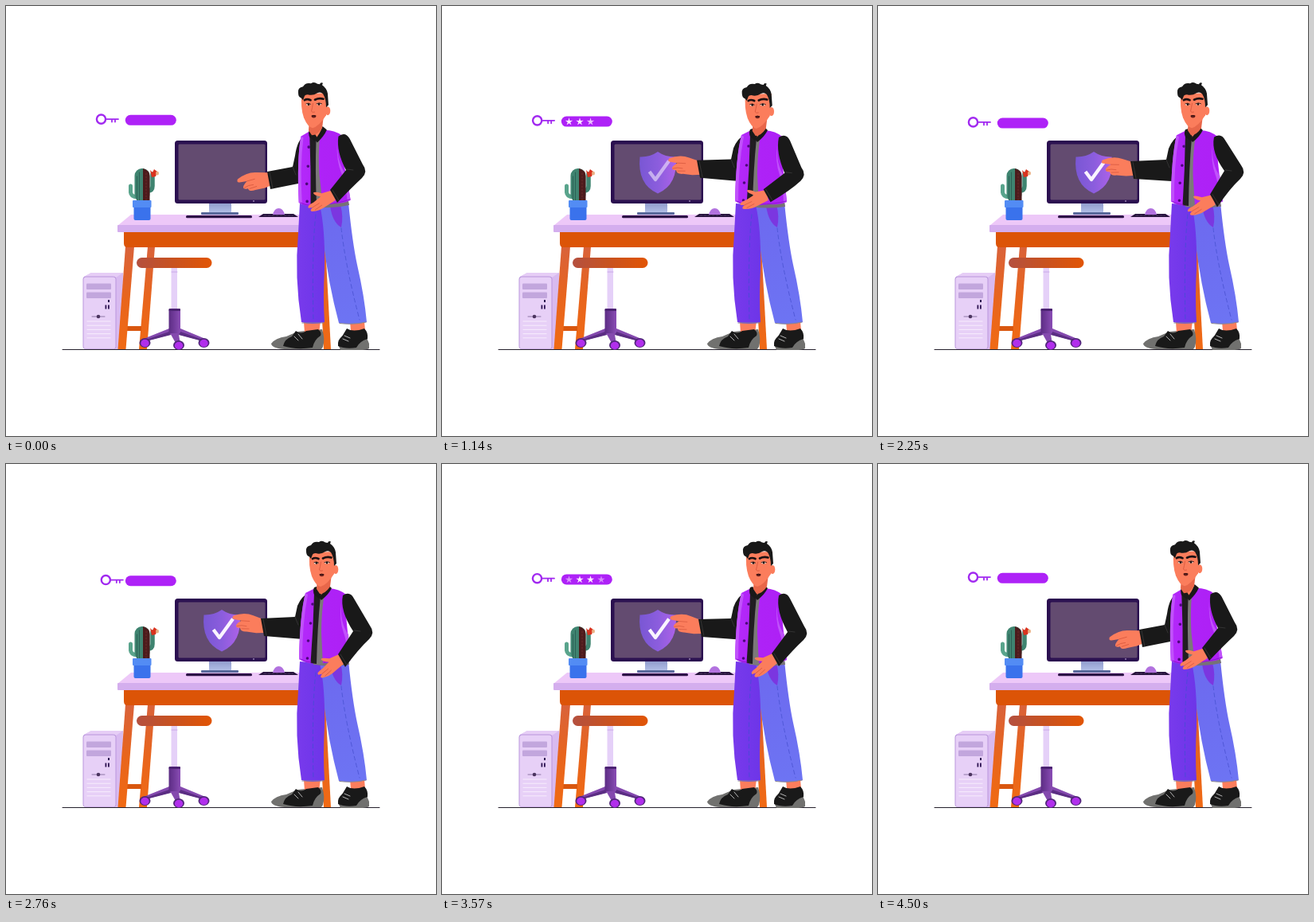
An HTML page with a canvas for the animation above (4.53 s loop, 540 px wide and 540 px high).

```html
<!DOCTYPE html>
<html lang="en">
<head>
<meta charset="utf-8">
<title>Password protection</title>
<style>
html, body { margin: 0; width: 100%; height: 100%; overflow: hidden; background: #fff; }
canvas { display: block; width: 540px; height: 540px; }
</style>
</head>
<body>
<canvas id="stage"></canvas>
<script>
const LOOP = 4530, STEP = 30, CYCLE = LOOP / 2;
const canvas = document.getElementById('stage');
const ctx = canvas.getContext('2d');
const ratio = window.devicePixelRatio || 1;
canvas.width = canvas.height = 540 * ratio;

const SKIN = '#fb7d5c', SKIN_DARK = '#d95a40', BLACK = '#191919';
const PURPLE = '#ae22f7', INK = '#2b1050';

const clamp = v => Math.max(0, Math.min(1, v));
const ease = (t, from, to) => {
  const p = clamp((t - from) / (to - from));
  return p * p * (3 - 2 * p);
};

function fill(d, color) {
  ctx.fillStyle = color;
  ctx.fill(new Path2D(d));
}
function line(d, color, width = 1, dash = []) {
  ctx.strokeStyle = color;
  ctx.lineWidth = width;
  ctx.setLineDash(dash);
  ctx.stroke(new Path2D(d));
}
function box(x, y, w, h, r, color) {
  ctx.fillStyle = color;
  ctx.beginPath();
  ctx.roundRect(x, y, w, h, r);
  ctx.fill();
}
function oval(x, y, rx, ry, color) {
  ctx.fillStyle = color;
  ctx.beginPath();
  ctx.ellipse(x, y, rx, ry, 0, 0, Math.PI * 2);
  ctx.fill();
}
function blend(x0, y0, x1, y1, ...colors) {
  const g = ctx.createLinearGradient(x0, y0, x1, y1);
  colors.forEach((c, i) => g.addColorStop(i / (colors.length - 1), c));
  return g;
}
function within(x, y, angle, draw) {
  ctx.save();
  ctx.translate(x, y);
  ctx.rotate(angle);
  draw();
  ctx.restore();
}

// time, lean, head x/y, left elbow x/y, left cuff x/y, left hand turn,
// right elbow x/y, right wrist x/y, right hand turn
const REST = [-.065, -9, -.8, 360, 202, 330, 219, -.37, 451, 208, 405, 238, -.14];
const POSES = [
  [0, ...REST],
  [690, 0, 0, 0, 363, 194, 325, 207, 0, 452, 211, 400, 237, 0],
  [1590, 0, 1, 0, 363, 192, 320, 204, -.1, 457, 212, 405, 238, -.07],
  [2250, -.012, 0, -.8, 362, 193, 319, 206, -.08, 459, 209, 415, 243.5, -.1],
  [2760, 0, 1, 0, 363, 192, 322, 205, -.03, 460, 212, 415, 246, -.27],
  [3570, 0, 2, 0, 363, 194, 324, 206, -.02, 458, 213, 412, 245, -.28],
  [3840, 0, 1.6, 0, 363, 194, 325, 206.5, -.02, 457, 212, 411, 244, -.26],
  [4500, ...REST],
  [LOOP, ...REST]
];

// Cubic interpolation that never overshoots a pose.
function poseAt(t) {
  let i = 0;
  while (i < POSES.length - 2 && t >= POSES[i + 1][0]) i++;
  const a = POSES[i], b = POSES[i + 1], h = b[0] - a[0], p = (t - a[0]) / h;
  const slope = (k, c) => {
    const m = POSES[k], n = POSES[k + 1];
    return m && n ? (n[c] - m[c]) / (n[0] - m[0]) : 0;
  };
  const tangent = (k, c) => {
    const s = slope(k - 1, c), e = slope(k, c);
    return s * e <= 0 ? 0 : 2 * s * e / (s + e);
  };
  return a.slice(1).map((v, j) => {
    const c = j + 1, q = 1 - p;
    return v * (1 + 2 * p) * q * q + b[c] * p * p * (3 - 2 * p)
      + h * (tangent(i, c) * p * q * q - tangent(i + 1, c) * p * p * q);
  });
}

function drawTower() {
  fill('M98 340L107 335H147L146 431H136V340Z', '#d8baf0');
  fill('M98 340L107 335H147L138 341Z', '#e6cdf6');
  box(96.5, 339.5, 42, 91.5, 4, '#b996dc');
  box(97.5, 340.5, 40, 90, 3, '#e7d0f7');
  box(101, 348.5, 31, 7.5, 1, '#c2a6dd');
  box(101, 359.5, 31, 7.5, 1, '#c2a6dd');
  box(128, 369, 2, 3, 0, INK);
  box(124.5, 375.5, 1.8, 5, 0, INK);
  box(128, 375.5, 1.8, 5, 0, INK);
  line('M108 390H124', '#8d77a6');
  oval(116, 390, 2.3, 2.3, '#4c3560');
  for (let y = 396; y < 420; y += 5.2) line(`M102 ${y}H131`, '#f7ecfd', 1);
}

function drawDesk() {
  const wood = blend(0, 303, 0, 431, '#d9623a', '#e8651d', '#f06a14');
  fill('M178 302H187L177 431H167Z', wood);
  fill('M152 402H170V408H151Z', '#d9570f');
  fill('M150 302H161L150.5 431H140.5Z', wood);
  fill('M392 300H401L408 431H399Z', wood);
  fill('M148 283H374V303H152Q148 303 148 298Z', '#dc5407');
  fill('M157 262H376V276H140Z', '#edc8f8');
  box(140, 275, 234, 9, 1, '#d4aeee');
}

function drawChair() {
  box(207.5, 328, 7.5, 54, 0, '#e5d0f8');
  line('M208 334H215', '#c9a9e8');
  box(164, 316, 94.5, 13, 6.5, blend(164, 0, 258, 0, '#b4503f', '#c9521f', '#e15505'));
  fill('M205 405L175 417V421L207 412.500L214 425H219L217 412.500L248 421V417L219 405Z', '#8449ae');
  fill('M205 409L176 419V421L207 413Z', '#5b2d83');
  fill('M219 409L247 419V421L217 413Z', '#5b2d83');
  box(204.5, 380, 14.5, 31, 2, blend(204, 0, 219, 0, '#5a2b82', '#8a4db5'));
  box(204.5, 380, 14.5, 3, 1, '#4b2272');
  for (const [x, y] of [[174.5, 423], [217, 426], [248.5, 423]]) {
    oval(x, y, 7, 6, '#51267a');
    oval(x, y + .5, 5.2, 4.7, '#b12fec');
  }
}

function drawMonitor() {
  box(255, 247, 28, 13, 0, blend(0, 247, 0, 260, '#8f9acb', '#b3c0e8'));
  box(245, 259, 47, 3, 1, '#59699c');
  box(212, 169, 116, 79, 3.5, INK);
  box(216.5, 173.5, 109, 70, 1.5, '#634b70');
  oval(311, 245, .8, .8, '#d8c7ee');
  box(226, 263, 83, 3.2, 1.5, '#2c1146');
  fill('M317 265L323 261H361L367 265Z', '#25123b');
  line('M324 263H360', '#5c4673', .7, [3, 2]);
  fill('M335 262Q337 254 342.5 254Q348 254 350 262Z', '#b272df');
}

function drawCactus() {
  line('M156.5 226V234Q157 239 164 240', '#59a48c', 5);
  line('M184 211V226Q184 232 178 232', '#3f8470', 5.5);
  box(161.5, 204, 19, 42, 9, '#3f8470');
  fill('M172 204Q180.500 206 180.500 214V246H172Z', '#4b1b1c');
  line('M167.500 209V244M164.500 214V244', '#28594f', .8);
  line('M176 210V244', '#7a3030', .8, [2, 2]);
  fill('M181 206L184 209L186 205L190 208L188 214L183 215Z', '#da331f');
  oval(190, 210, 2, 2.5, '#eab185');
  box(160.5, 249, 21, 20, 2, '#3a72ec');
  box(159, 244, 23.5, 9, 1, '#538cf4');
}

function drawShield(t) {
  const out = 1 - ease(t, 3880, 4320);
  ctx.globalAlpha = ease(t, 390, 1000) * out;
  fill('M271 183Q281 190 293.5 189.5Q297 224 271 235.5Q245 224 248.5 189.5Q261 190 271 183Z',
    blend(248, 0, 294, 0, '#7957d4', '#8b5ddd', '#ad62e9'));
  ctx.globalAlpha = ease(t, 900, 1350) * out;
  ctx.lineCap = 'butt';
  line('M260.500 208L268 218L285 194.500', '#faf4ff', 4.4);
  ctx.lineCap = 'round';
  ctx.globalAlpha = 1;
}

function drawStar(x, y) {
  ctx.fillStyle = '#fdeeff';
  ctx.beginPath();
  for (let i = 0; i < 10; i++) {
    const r = i % 2 ? 1.8 : 5, a = (i / 5 - .5) * Math.PI;
    ctx.lineTo(x + r * Math.cos(a), y + r * Math.sin(a));
  }
  ctx.fill();
}

function drawPassword(t) {
  const local = t % CYCLE;
  const y = 145.2 - 1.9 * Math.cos(2 * Math.PI * (t - 60) / LOOP);
  box(149.8, y - 6.5, 64, 13, 6.5, PURPLE);
  for (let i = 0; i < 4; i++) {
    ctx.globalAlpha = ease(local, 590 + i * 205, 790 + i * 205)
      * (1 - ease(local, 1205 + i * 240, 1425 + i * 240));
    drawStar(159.5 + i * 13.5, y + .3);
  }
  ctx.globalAlpha = 1;
  const slide = 6.3 * Math.sin(Math.PI * clamp(local / 1200)) ** 2;
  within(119.5 + slide, y - 1.2, 0, () => {
    ctx.strokeStyle = '#a129f0';
    ctx.lineWidth = 2.4;
    ctx.setLineDash([]);
    ctx.beginPath();
    ctx.arc(0, 0, 5.6, 0, Math.PI * 2);
    ctx.stroke();
    line('M6 0H21.5M13.5 0V3.5M17.5 0V3.5', '#a129f0', 1.8);
  });
}

function drawLegs() {
  fill('M333 424Q338 417 352 415L366 409L397 406Q401 418 398 428L396 431H350Q334 430 333 424Z', '#71716f');
  fill('M417 425L422 414H452L456 424V430Q452 432.500 440 432H420Z', '#71716f');
  fill('M374 396H395L393 411H375Z', SKIN);
  fill('M432 396H450L451 408H433Z', SKIN);
  fill('M348 427Q350 418 359 415L364 408Q370 413 377 408L392 406Q397 410 395 414Q387 419 385 429Q364 432 348 427Z', BLACK);
  fill('M417 427Q416 419 422 415L428 405Q436 410 450 405Q455 410 454 418Q444 421 440 429Q426 431 417 427Z', BLACK);
  line('M362 415L367 420M367 412L372 418M425 414L432 417M423 418L430 421', '#dedede', .8);
  fill('M389 250L430 247Q435 297 441 325Q450 364 453 397Q436 401 418 398Q405 350 398 292Z',
    blend(398, 250, 440, 398, '#6d69ef', '#6d74f3'));
  fill('M369 248L394 250Q401 280 400 330Q398 365 400 397Q385 401 371 397Q362 340 367 285Z',
    blend(366, 0, 401, 0, '#783aec', '#6d35e8'));
  fill('M407 251L420 250Q424 264 421 278Q410 272 407 251Z', '#7b36e0');
  line('M389 262Q384 305 386 395', '#4d49d8', 1, [5, 4]);
  line('M421 279Q426 325 444 394', '#5058d8', 1, [5, 4]);
  line('M372 398H399M419 398.500Q436 400.500 452 397', '#8a858f', 1.2);
}

function drawPointingHand() {
  fill('M4 -9L-11 -15Q-22 -20 -36 -15.500Q-39 -12 -35 -11L-26 -9Q-34 -5 -33 -2Q-32 0 -28 0Q-28 5 -20 5L-8 7H4Z', SKIN);
  line('M-26 -9L-16 -8M-32 -2.500Q-26 -4 -20 -2M-26 1L-17 1.500', SKIN_DARK, .8);
}

function drawRestingHand() {
  fill('M6 -6L-8 -4Q-17 -8 -18.500 -6Q-18 -3 -10 0L-20 6Q-29 9 -27 12L-22 12Q-27 16 -23 17Q-14 18 -5 13L8 7Z', SKIN);
  line('M-22 12L-13 8M-19 15.500L-10 11', SKIN_DARK, .8);
}

function drawVest() {
  fill('M388 246L430 245L431 252Q408 255 388 252Z', '#777276');
  fill('M386 157L376 162Q369 190 368 245Q375 250 388 251L412 249Q424 250 433 246Q431 225 429 211Q426 185 427 164Q419 157 406 156Z',
    blend(368, 0, 433, 0, '#b42afa', PURPLE, '#ae20f5'));
  fill('M376 162Q369 190 368 245L372 247Q372 200 379 164Z', '#c052fb');
  fill('M421 172Q419 200 430 214L433 246L429 247Q428 222 424 212Q418 196 421 172Z', '#c052fb');
  fill('M390 163L400 163Q396 185 396 212L398 252L386 252Q389 205 390 163Z', '#7c7979');
  fill('M387 162L395 166Q391 205 390 251L382.500 250Q386 205 387 162Z', '#211d21');
  fill('M389 155L388 163L394 168L405 153Z', SKIN);
  fill('M387 155Q385 159 387 164L393 169L396 164L390 154Z', BLACK);
  fill('M404 151L409 156Q405 164 396 171L393 167Q400 161 404 151Z', BLACK);
  line('M370 245Q377 249 383 249M399 249Q417 249 432 245', '#8d17d2', 1);
  for (const [x, y] of [[385, 176], [382.5, 200], [379.5, 222], [378.5, 244]]) oval(x, y, 1.8, 1.8, '#4c087b');
}

function drawHead() {
  fill('M390 142L408 138L406 154Q400 163 393 163L389 157Z', '#e8674a');
  oval(413, 132.5, 3.3, 5.5, SKIN);
  fill('M380.500 111Q378.500 128 383 141Q388 153 394 154Q402 152 411 138L413 110Z', SKIN);
  fill('M376 110Q375 103 382 102Q385 96.500 392 98Q396 95.500 400 98.500L403 99Q404 96 407 97.500L406 100Q412 104 413 111L414 125L411 128Q411 117 407 111Q404 108 400 110Q394 114 388 112Q384 112 383.500 115L382 119L380 116.500Q376 115 376 110Z', BLACK);
  line('M384 119Q387 117 391.500 119M397 118.500Q402 116 407.500 117.500', '#1b1012', 2.7);
  oval(388.5, 124.3, 2.6, 1.4, '#fff0e8');
  oval(402, 124, 2.8, 1.4, '#fff0e8');
  oval(389, 124.3, 1.4, 1.5, '#20100f');
  oval(402, 124, 1.4, 1.5, '#20100f');
  line('M386 123.500Q389 122 391.500 124M399 123.500Q402.500 121.500 405.500 123.500', '#24100f', .9);
  line('M394.500 123Q393.500 129 392.500 133Q393.500 135 396.500 134', SKIN_DARK, .9);
  oval(395.5, 139.5, 2.8, 1.8, '#64201d');
  line('M393 138.700Q395.500 137.700 398 138.700', '#2c0d0e', 1);
}

function drawPerson(t) {
  const [lean, headX, headY, elbowX, elbowY, cuffX, cuffY, pointTurn,
    outX, outY, wristX, wristY, restTurn] = poseAt(t);
  const PIVOT = { x: 400, y: 250 };
  const leaned = (x, y) => {
    const dx = x - PIVOT.x, dy = y - PIVOT.y, c = Math.cos(lean), s = Math.sin(lean);
    return `${PIVOT.x + dx * c - dy * s} ${PIVOT.y + dx * s + dy * c}`;
  };

  within(cuffX, cuffY, pointTurn, drawPointingHand);
  fill(`M${leaned(381, 161)}Q${leaned(371, 166)} ${elbowX + 3} ${elbowY - 14}
    L${elbowX} ${elbowY}L${cuffX - 2} ${cuffY - 11}L${cuffX + 2} ${cuffY + 11}
    L${elbowX + 7} ${(elbowY + 440) / 3 + 9}L${leaned(374, 210)}Z`, BLACK);
  line(`M${cuffX + 1} ${cuffY - 10}L${cuffX + 5} ${cuffY + 10}M${elbowX} ${elbowY}l4 10`, '#3a3a3a', .8);

  drawLegs();
  within(PIVOT.x, PIVOT.y, lean, () => {
    ctx.translate(-PIVOT.x, -PIVOT.y);
    drawVest();
  });
  within(headX, headY, 0, drawHead);

  within(wristX, wristY, restTurn, drawRestingHand);
  fill(`M${leaned(423, 165)}Q${leaned(432, 159)} ${leaned(437, 169)}
    L${outX - 3} ${outY - 9}Q${outX + 4} ${outY} ${outX - 4} ${outY + 8}
    Q${outX - 17} ${outY + 20} ${wristX + 11} ${wristY + 9}
    L${wristX + 2} ${wristY - 7}L${outX - 24} ${outY - 2}
    Q${leaned(419, 184)} ${leaned(423, 165)}Z`, BLACK);
  line(`M${wristX + 5} ${wristY - 7}L${wristX + 13} ${wristY + 6}M${outX - 23} ${outY - 3}l8 1`, '#3a3a3a', .8);
}

function render(t) {
  ctx.setTransform(ratio, 0, 0, ratio, 0, 0);
  ctx.fillStyle = '#fff';
  ctx.fillRect(0, 0, 540, 540);
  ctx.lineCap = ctx.lineJoin = 'round';
  line('M71 431.500H469', '#25202c', 1);
  drawTower();
  drawDesk();
  drawChair();
  drawMonitor();
  drawCactus();
  drawShield(t);
  drawPassword(t);
  drawPerson(t);
}

const start = performance.now();
function tick() {
  const t = (performance.now() - start) % LOOP;
  render(Math.floor(t / STEP) * STEP);
  requestAnimationFrame(tick);
}
tick();
</script>
</body>
</html>
```
